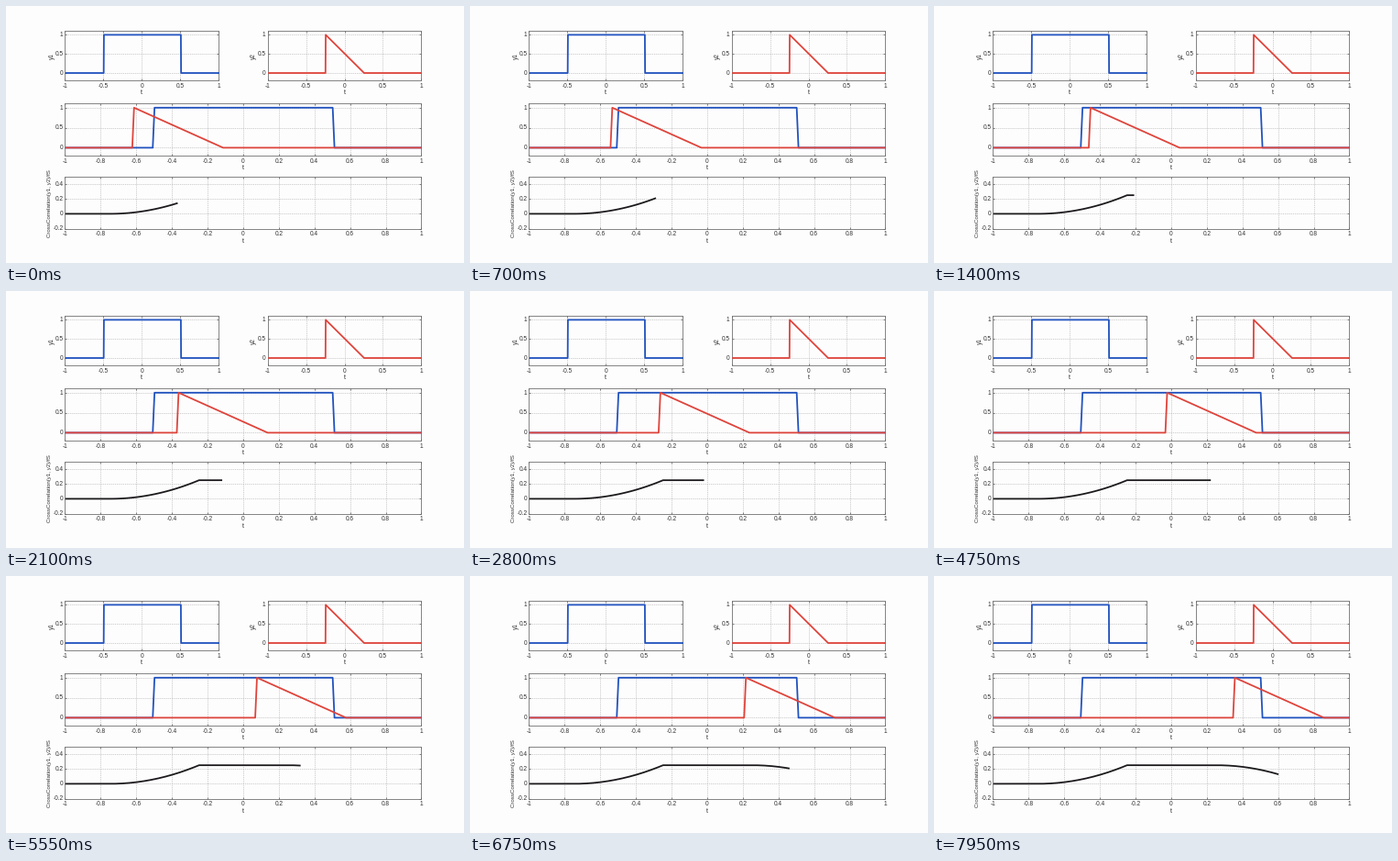
A matplotlib script for the animation above (8 s loop, 500x280 px).

```python
import numpy as np
import matplotlib.pyplot as plt
from matplotlib.animation import FuncAnimation
from matplotlib.collections import LineCollection

W, H, DPI = 500, 280, 72
FRAMES, STEP_MS = 160, 50
DT = 0.01
BLUE, RED, BLACK = "#2052bf", "#de443b", "#1c1a1c"
INK, GRID, PAPER = "#686868", "#b0b0b0", "#fefdfe"

plt.rcParams["font.family"] = "Liberation Sans"
fig = plt.figure(figsize=(W / DPI, H / DPI), dpi=DPI, facecolor=PAPER)
stage = fig.add_axes([0, 0, 1, 1])
stage.set_xlim(0, W)
stage.set_ylim(H, 0)
stage.axis("off")


def label(x, y, text, size=6.5, **kw):
    opts = dict(ha="center", va="center", color="#303030")
    opts.update(kw)
    return stage.text(x, y, text, fontsize=size, **opts)


class Panel:
    """A boxed plot placed in stage pixels, with t running from -1 to 1."""

    def __init__(self, left, right, zero, unit, low, high, xticks, yticks):
        self.mid, self.half = (left + right) / 2, (right - left) / 2
        self.zero, self.unit = zero, unit
        top, bottom = self.y(high), self.y(low)
        grid, ticks = [], []
        for v in xticks:
            x = self.x(v)
            if abs(v) < 0.99:
                grid.append([(x, bottom), (x, top)])
            ticks += [[(x, bottom), (x, bottom - 2)], [(x, top), (x, top + 2)]]
            label(x, bottom + 6, f"{v:g}")
        for v in yticks:
            y = self.y(v)
            if v > low:
                grid.append([(left, y), (right, y)])
            ticks += [[(left, y), (left + 2, y)], [(right, y), (right - 2, y)]]
            label(left - 2, y + 0.4, f"{v:g}", ha="right")
        label(self.mid, bottom + 13.5, "t", 7.2)
        box = [(left, top), (right, top), (right, bottom),
               (left, bottom), (left, top)]
        stage.add_collection(LineCollection(
            grid, colors=GRID, linewidths=0.7,
            linestyles=[(0, (1.2, 1.4))], zorder=1))
        stage.add_collection(LineCollection(
            ticks + [box], colors=INK, linewidths=0.8, zorder=2))

    def x(self, t):
        return self.mid + self.half * np.asarray(t)

    def y(self, v):
        return self.zero - self.unit * np.asarray(v)

    def points(self, t, v):
        # Curves run through pixel centres.
        return self.x(t) + 0.5, self.y(v)

    def line(self, t, v, color, order=3):
        return stage.plot(*self.points(t, v), color=color, lw=1.8,
                          zorder=order, solid_capstyle="butt",
                          solid_joinstyle="round")[0]


def pulse(rise):
    return [-1, -0.5 - rise, -0.5, 0.5, 0.5 + rise, 1], [0, 0, 1, 1, 0, 0]


def ramp(shift, rise):
    t = [-1, shift - 0.25 - rise, shift - 0.25, shift + 0.25, 1]
    return t, [0, 0, 1, 0, 0]


def correlation(t):
    enter = np.clip(t + 0.75, 0, 0.5)
    leave = np.clip(t - 0.25, 0, 0.5)
    return enter ** 2 - leave ** 2


# Sweep position over time; playback speed is slightly uneven.
TIMES = [0, 1.4, 2.8, 3.95, 5.55, 6.75, 7.95]
SHIFTS = [-0.371, -0.212, -0.022, 0.119, 0.317, 0.458, 0.6]


def shift_at(frame):
    s = np.interp(frame * STEP_MS / 1000, TIMES, SHIFTS)
    return round(s / DT) * DT


halves = [-1, -0.5, 0, 0.5, 1]
fifths = [round(k / 5, 1) for k in range(-5, 6)]
unit_ticks = [0, 0.5, 1]

first = Panel(64.4, 232.4, 73, 41.6, -0.2, 1.1, halves, unit_ticks)
second = Panel(285.6, 453.4, 73, 41.6, -0.2, 1.1, halves, unit_ticks)
both = Panel(64.4, 453.4, 154.4, 43.6, -0.2, 1.1, fifths, unit_ticks)
result = Panel(64.4, 453.4, 226.4, 81, -0.2, 0.5, fifths, [-0.2, 0, 0.2, 0.4])

label(50, 55, "y1", rotation=90)
label(270.5, 55, "y2", rotation=90)
label(47.8, 215.5, "CrossCorrelation(y1, y2)/fS", 6.1, rotation=90)

first.line(*pulse(0.003), BLUE)
second.line(*ramp(0, 0.003), RED)
both.line(*pulse(DT), BLUE)
slider = both.line(*ramp(0, DT), RED, 4)
trace = result.line([-1], [0], BLACK)


def draw(frame):
    s = shift_at(frame)
    slider.set_data(*both.points(*ramp(s + DT / 2, DT)))
    t = np.linspace(-1, s, round((s + 1) / DT) + 1)
    trace.set_data(*result.points(t, correlation(t)))
    return slider, trace


anim = FuncAnimation(fig, draw, frames=FRAMES, interval=STEP_MS,
                     init_func=lambda: draw(0), repeat=True,
                     repeat_delay=0, blit=True)
plt.show()
```
